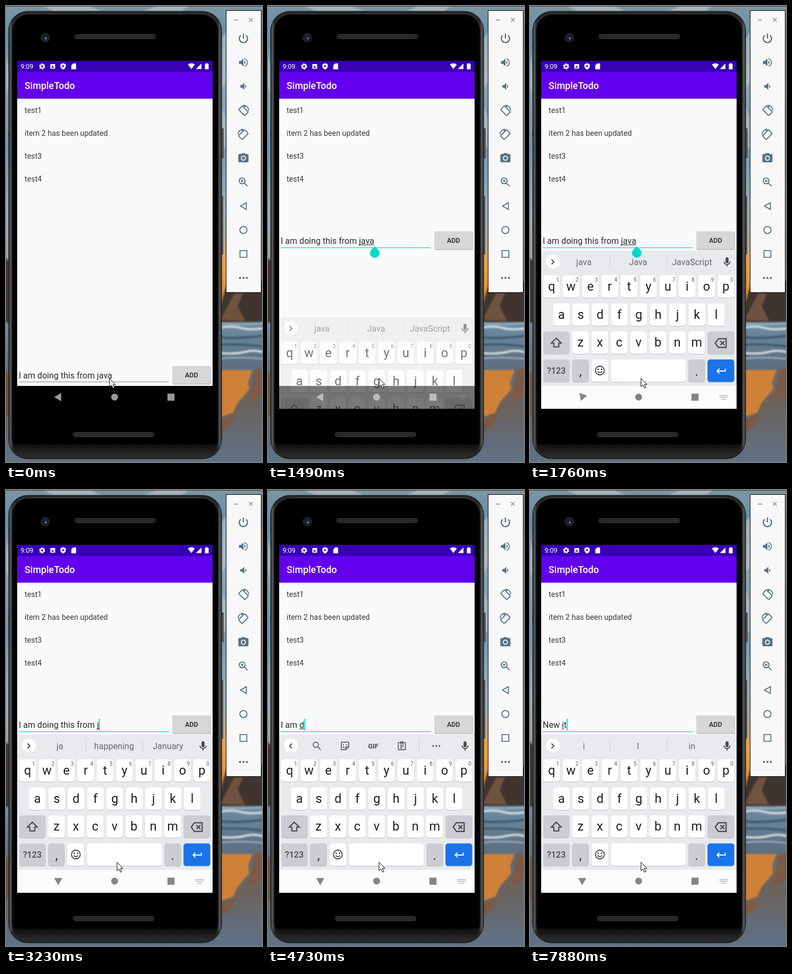
Animation of 482x857 px, one loop 8000 ms. Source, as an HTML page:

```html
<!DOCTYPE html>
<html lang="en">
<head>
<meta charset="utf-8">
<title>Todo app demo</title>
<style>
html, body { margin: 0; width: 100%; height: 100%; overflow: hidden; background: #000 }
svg { display: block; width: 482px; height: 857px }
text { font-family: Roboto, sans-serif; white-space: pre }
.mid { text-anchor: middle }
.line { fill: none; stroke: currentColor; stroke-width: 2 }
.fill { fill: currentColor }
</style>
</head>
<body>
<svg viewBox="0 0 482 857">
<defs>
  <linearGradient id="sky" x2="0" y2="1">
    <stop offset="0" stop-color="#7f959f"/><stop offset=".1" stop-color="#5d93b3"/>
    <stop offset=".25" stop-color="#8ba6b5"/><stop offset=".45" stop-color="#6c9ab8"/>
    <stop offset=".65" stop-color="#9ab0b8"/><stop offset="1" stop-color="#9c9488"/>
  </linearGradient>
  <linearGradient id="glow" x2="0" y2="1">
    <stop offset="0" stop-color="#e5a052" stop-opacity="0"/><stop offset=".4" stop-color="#eba23f"/>
    <stop offset="1" stop-color="#d27d2b"/>
  </linearGradient>
  <linearGradient id="sea" x2="0" y2="1">
    <stop offset="0" stop-color="#6d8ea5"/><stop offset=".3" stop-color="#5c7183"/>
    <stop offset=".6" stop-color="#6b625c"/><stop offset="1" stop-color="#5f7287"/>
  </linearGradient>
  <linearGradient id="edge">
    <stop offset="0" stop-color="#1b1b1c"/><stop offset=".007" stop-color="#58595b"/>
    <stop offset=".018" stop-color="#252627"/><stop offset=".982" stop-color="#252627"/>
    <stop offset=".993" stop-color="#58595b"/><stop offset="1" stop-color="#1b1b1c"/>
  </linearGradient>
  <linearGradient id="lip" x2="0" y2="1">
    <stop offset="0" stop-color="#0a0a0a"/><stop offset="1" stop-color="#2c2c2d"/>
  </linearGradient>
  <filter id="soft"><feGaussianBlur stdDeviation="1.500"/></filter>
  <clipPath id="screen"><path d="M21 103h368v654H21z"/></clipPath>
</defs>

<!-- wallpaper -->
<path fill="url(#sky)" d="M0 0h482v595H0z"/>
<path fill="url(#sea)" d="M0 592h482v265H0z"/>
<g filter="url(#soft)">
  <path fill="#c1c9cb" opacity=".6" d="M406 60l20-25v90l-20 30zM406 190l8 20v60l-8-10zM0 90l6 30v50l-6-20zM60-4h90l30 14H90zM290-4h60l-20 14h-70z"/>
  <path fill="url(#glow)" d="M400 415h20v178h-20z"/>
  <path fill="#40352f" d="M-4 470l10 10v115H-4zM404 566q12-62 30-66l56 20v74h-86z"/>
  <path fill="#6d5340" d="M404 590l26-50h16l-10 24 14 28z"/>
  <path fill="none" stroke="#d3dade" stroke-width="4" d="M400 605q24-5 42 0t48 0M400 652q30 3 50-2t40 3"/>
  <path fill="none" stroke="#b3bfc6" stroke-width="2" d="M400 597q40 3 90-1M400 663q40-5 90 1"/>
  <path fill="none" stroke="#415a6c" stroke-width="4" d="M400 622q30 5 90-3M400 637q40-3 90 4"/>
  <path fill="#cf8138" d="M400 684h64l-8 22 2 14-22 26-8 18-28 10z"/>
  <path fill="#7d5a45" d="M468 682h24v46l-40 18 12-32zM400 780l34-14-14 26-20 8z"/>
  <path fill="#6b553f" d="M-4 690h10v80H-4z"/>
</g>
<path fill="#2f3439" d="M0 0h482v1H0z"/>

<!-- phone -->
<path fill="#55575a" d="M4 72h3v9H4zM4 237h3v10H4zM404 72h2v9h-2zM404 230h6v56h-6zM404 357h5v110h-5z"/>
<rect x="5" y="10" width="401" height="841" rx="36" fill="url(#edge)" stroke="#161617"/>
<rect x="10.500" y="14.500" width="390" height="832" rx="32" fill="#0c0c0d" stroke="#5c5d5f" stroke-width=".7"/>
<rect x="14" y="17" width="383" height="828" rx="30"/>
<path fill="url(#lip)" d="M13 821q1 3 14 3h357q13 0 14-3 0 26-32 26H45q-32 0-32-26z"/>
<g fill="#1c1c1c" stroke="#48484a">
  <rect x="129.500" y="53.500" width="152" height="8" rx="4"/>
  <rect x="126.500" y="801.500" width="152" height="8" rx="4"/>
</g>
<path stroke="#3c3c3e" stroke-width="4" stroke-dasharray="1 1" d="M133 57.500h145M130 805.500h145"/>
<circle cx="74" cy="59.500" r="8" fill="#1d1e22" stroke="#333438"/>
<circle cx="74" cy="59.500" r="4" fill="#15234a"/>
<circle cx="75" cy="61" r="1.800" fill="#7186c9"/>

<!-- app -->
<g clip-path="url(#screen)">
  <path fill="#fafafa" d="M21 103h368v611H21z"/>
  <path id="navBase" fill="#fafafa" d="M21 713h368v44H21z"/>
  <path fill="#d4d4d6" d="M21 174h368v1.500H21z"/>
  <path fill="#ededee" d="M21 175.500h368v1.500H21z"/>
  <path fill="#6200ee" d="M21 124h368v50H21z"/>
  <path fill="#3700b3" d="M21 103h368v21H21z"/>
  <g fill="#fff">
    <text x="27.500" y="118" font-size="12.500">9:09</text>
    <text x="35" y="156" font-size="17.900" font-weight="500">SimpleTodo</text>
    <circle cx="68" cy="113.500" r="3.300" fill="none" stroke="#fff" stroke-width="2.500"/>
    <circle cx="68" cy="113.500" r="5" fill="none" stroke="#fff" stroke-width="1.600" stroke-dasharray="2.620"/>
    <rect x="83.500" y="109" width="9" height="9" rx="1"/>
    <text class="mid" x="88" y="116.500" font-size="8" font-weight="700" fill="#3700b3">A</text>
    <path d="M107.500 107.500l5 2v3.500q0 4-5 6.500-5-2.500-5-6.500v-3.500z"/>
    <path fill="#3700b3" d="M106 110.500l4.200 2.500-4.200 2.500z"/>
    <path d="M126.500 108h5.500v11h-9v-7.500z"/>
    <path d="M342.500 110q6.500-4.500 13 0l-6.500 8.500zM368 108v10.500h-10.500zM376.500 107.500h3v1.200h2V119h-7v-10.300h2z"/>
  </g>
  <g id="list" font-size="14.300" fill="#3a3a3a"></g>

  <g id="board">
    <path fill="#e8eaed" d="M21 460h368v254H21z"/>
    <path fill="#fcfcfc" d="M21 714h368v200H21z"/>
    <circle cx="43" cy="481.500" r="13.500" fill="#d0d2d5"/>
    <circle cx="43" cy="480.800" r="13.500" fill="#fff"/>
    <path id="chevron" fill="none" stroke="#444" stroke-width="1.800"/>
    <g id="words" class="mid" font-size="16.100" fill="#666a6e">
      <path stroke="#cdd0d4" d="M150.500 470v22M257.500 470v22"/>
      <text x="101.500" y="487"></text><text x="203.500" y="487"></text><text x="305" y="487"></text>
    </g>
    <g id="tools" color="#5a5d61"></g>
    <g id="keys"></g>
  </g>

  <path id="shade" d="M21 714h368v43H21z"/>
  <g id="nav">
    <path id="back" d="M90.500 735l13.500-7.700v15.400z"/>
    <circle cx="204.500" cy="735" r="6.500"/><path d="M304 728.500h13.300v13.300H304z"/>
    <path id="hide" fill="none" stroke="#8a8a8a" stroke-width="1.600" stroke-dasharray="1.600 1" d="M357 732h15M357 735.300h15M360 739h9"/>
  </g>

  <g id="row">
    <rect x="313.500" y="425" width="72.500" height="33.500" rx="2" fill="#b9b9b9"/>
    <rect x="313" y="423.500" width="72.500" height="33.500" rx="2" fill="#d6d7d7"/>
    <text class="mid" x="349.300" y="444.500" font-size="12.500" font-weight="500" fill="#222">ADD</text>
    <path id="field"/>
    <text id="input" x="24" y="447" font-size="16.050" fill="#2b2b2b"></text>
    <path id="under" stroke="#333" stroke-width="1.200"/>
    <rect id="caret" y="430" width="1.800" height="22" fill="#03dac5"/>
    <path id="handle" fill="#03dac5" d="M201 451.500l6.400 6.400a9 9 0 1 1-12.800 0z"/>
  </g>
</g>

<!-- emulator panel -->
<path fill="#f8f8f8" stroke="#000" d="M414.500 8.500h66v530h-66z"/>
<path fill="none" stroke="#7d8b92" stroke-width="1.300" d="M429 26.500h8M457.500 22.500l7 7M464.500 22.500l-7 7"/>
<g id="panel" color="#587280"></g>

<path id="mouse" fill="#fff" stroke="#000" d="M0 0v16l3.800-3.300 2.700 6 2.600-1.200-2.700-5.800h4.800z"/>
</svg>

<script>
const $ = id => document.getElementById(id);
const line = d => `<path class="line" d="${d}"/>`;
const fill = d => `<path class="fill" fill-rule="evenodd" d="${d}"/>`;
// places a 24-unit icon with its centre at x, y
const icon = (x, y, size, body) =>
  `<g transform="translate(${x} ${y}) scale(${size / 24}) translate(-12 -12)">${body}</g>`;
const dots = r => [5, 12, 19].map(x => `<circle class="fill" cx="${x}" cy="12" r="${r}"/>`).join('');

const speaker = 'M3 9v6h4l5 5V4L7 9z', wave = 'M14 8v8a4.500 4.500 0 0 0 0-8z';
const turn = '<rect class="line" x="7" y="4.500" width="10.500" height="17" rx="1.500" transform="rotate(-45 12 13)"/>'
  + line('M12.500 2a10.500 10.500 0 0 1 10 10M12 2l3.500 3.500');
$('panel').innerHTML = [
  [22, line('M12 2v10M6.500 5.500a8.500 8.500 0 1 0 11 0').replaceAll('/>', ' style="stroke-width:2.500"/>')],
  [22, fill(speaker + wave + 'M14 3.200v2a7 7 0 0 1 0 13.600v2a9 9 0 0 0 0-17.600z')],
  [20, icon(14, 12, 24, fill(speaker + wave))],
  [23, turn],
  [23, `<g transform="matrix(-1 0 0 1 24 0)">${turn}</g>`],
  [23, fill('M9 2L7.200 4H4a2 2 0 0 0-2 2v12a2 2 0 0 0 2 2h16a2 2 0 0 0 2-2V6a2 2 0 0 0-2-2h-3.200L15 2zM12 17a5 5 0 1 1 0-10 5 5 0 0 1 0 10z')
    + '<circle class="fill" cx="12" cy="12" r="3.200"/>'],
  [23, '<circle class="line" cx="9.500" cy="9.500" r="5.700"/>' + line('M13.700 13.700l6.300 6.300M9.500 7v5M7 9.500h5')],
  [22, line('M18 5v14L6 12z')],
  [22, '<circle class="line" cx="12" cy="12" r="7.300"/>'],
  [22, line('M5 5h14v14H5z')],
  [22, dots(2.2)]
].map(([size, body], i) => icon(447, 61 + 45 * i, size, body)).join('');

$('list').innerHTML = ['test1', 'item 2 has been updated', 'test3', 'test4']
  .map((s, i) => `<text x="35" y="${201 + 43 * i}">${s}</text>`).join('');

$('tools').innerHTML =
  icon(92, 481, 20, '<circle class="line" cx="9.500" cy="9.500" r="6"/>' + line('M14 14l6.500 6.500'))
  + icon(145, 481, 20, line('M5 3.500h14a1.500 1.500 0 0 1 1.500 1.500v9l-6.500 6.500H5A1.500 1.500 0 0 1 3.500 19V5A1.500 1.500 0 0 1 5 3.500zM14 20v-6h6M7 13q2 4 5 3')
    + fill('M7 8h2.500v2.500H7zM14 8h2.500v2.500H14z'))
  + '<text class="mid fill" x="198" y="485.500" font-size="12.500" font-weight="900">GIF</text>'
  + icon(252, 481, 20, line('M4 4.500h16v16H4zM8 10h8M8 13.500h8M8 17h5') + fill('M8 2h8v5H8z'))
  + '<path stroke="#cdd0d4" d="M284.500 470v22"/>'
  + icon(317, 481, 20, dots(2));

function key(x, y, w, label = '', color = '#fff', base = 28.7) {
  return `<rect x="${x}" y="${y + 1}" width="${w}" height="42.300" rx="5" fill="#b9bbbf"/>`
    + `<rect x="${x}" y="${y}" width="${w}" height="42.300" rx="5" fill="${color}"/>`
    + `<text class="mid" x="${x + w / 2}" y="${y + base}" font-size="23.500" fill="#1d1d1f">${label}</text>`;
}
const grey = '#cbcdd3', pitch = 36.45;
const letters = (s, x, y) => [...s].map((c, i) => key(x + pitch * i, y, 31.5, c)).join('');
$('keys').innerHTML = letters('qwertyuiop', 25, 506) + letters('asdfghjkl', 43.3, 559) + letters('zxcvbnm', 79.3, 611.5)
  + [...'1234567890'].map((n, i) =>
    `<text class="mid" x="${52 + pitch * i}" y="517.500" font-size="10" fill="#55585c">${n}</text>`).join('')
  + key(25, 611.5, 49.5, '', grey) + key(334.3, 611.5, 50.2, '', grey) + key(25, 664.3, 49.5, '', grey)
  + key(79.3, 664.3, 31.5, ',', grey, 31) + key(115.8, 664.3, 31.5) + key(152.3, 664.3, 141)
  + key(298, 664.3, 31.5, '.', grey, 31) + key(334.3, 664.3, 50.2, '', '#1a73e8')
  + '<text class="mid" x="49.500" y="691" font-size="16" font-weight="500" fill="#444649">?123</text><g color="#444649">'
  + icon(49.5, 633, 25, line('M12 3.500l-9 9h4.500v7h9v-7H21z'))
  + icon(359, 633.5, 26, line('M8 4.500h13.500v15H8L2.500 12zM11.500 8.500l7 7M18.500 8.500l-7 7'))
  + icon(131.5, 685, 22, '<circle class="line" cx="12" cy="12" r="9"/>' + line('M7.500 14q4.500 5 9 0')
    + '<circle class="fill" cx="8.500" cy="9.500" r="1.600"/><circle class="fill" cx="15.500" cy="9.500" r="1.600"/>')
  + icon(371, 481, 21, '<rect class="fill" x="8.800" y="2" width="6.400" height="12.500" rx="3.200"/>' + line('M5.500 11a6.500 6.500 0 0 0 13 0M12 17.500V22'))
  + '</g><g color="#fff">' + icon(359.5, 686, 22, line('M21 7v5H4M9 7l-5 5 5 5')) + '</g>';

// last row whose time has come
const at = (rows, t) => rows.findLast(r => r[0] <= t);

const oldText = 'I am doing this from java', newText = 'New it';
const lengths = [[0, 25], [2960, 24], [3110, 23], [3230, 22], [3380, 21], [3500, 20], [3620, 19], [3860, 18],
  [4010, 17], [4130, 15], [4250, 13], [4370, 11], [4490, 10], [4610, 8], [4730, 6], [4850, 4], [4970, 2], [5120, 0],
  [6330, 1], [6600, 2], [6900, 3], [7440, 4], [7600, 5], [7880, 6]];
const hints = [[0, 'java', 'Java', 'JavaScript'], [3110, 'ja', 'happening', 'January'], [3380],
  [6480, 'New', 'News', 'Newer'], [7740, 'i', 'I', 'in']];
// time, keyboard drop, opacity, shade, back arrow angle
const slide = [[0, 300, 0, 1, 0], [1340, 215, .3, .7, 0], [1490, 125, .6, .52, 0], [1610, 35, .9, .2, -35],
  [1760, 0, 1, 0, -70], [1880, 0, 1, 0, -87], [2030, 0, 1, 0, -90]];
const blink = [[0, 0], [910, 1], [1410, 0], [1880, 1], [2400, 0], [2960, 1], [5550, 0], [6050, 1]];

const pen = document.createElement('canvas').getContext('2d');
const set = (id, attrs) => { for (const k in attrs) $(id).setAttribute(k, attrs[k]); };
const show = (id, on) => set(id, { visibility: on ? 'visible' : 'hidden' });

function draw(t) {
  const focused = t >= 910, raised = t >= 1340;
  const text = (t < 5120 ? oldText : newText).slice(0, at(lengths, t)[1]);
  pen.font = '16.05px Roboto, sans-serif';
  const endOf = s => 24 + pen.measureText(s).width;

  $('input').textContent = text;
  set('row', { transform: `translate(0 ${raised ? 0 : 253})` });
  set('field', focused ? { fill: '#03dac5', d: 'M24 453.800h282.500v1.200H24z' } : { fill: '#858585', d: 'M24 453h282.500v1H24z' });
  set('caret', { x: endOf(text) - .2 });
  show('caret', at(blink, t)[1]);
  show('handle', focused && t < 2960);

  // the word being composed is underlined a moment late
  const marked = text.slice(0, at(lengths, Math.max(0, t - 130))[1]);
  const start = marked.lastIndexOf(' ') + 1;
  set('under', { d: `M${endOf(marked.slice(0, start))} 448.800H${endOf(marked)}` });
  show('under', raised && start < marked.length);

  const [, drop, alpha, shade, angle] = at(slide, t);
  set('board', { transform: `translate(0 ${drop})`, opacity: alpha });
  set('shade', { opacity: shade });
  set('back', { transform: `rotate(${angle} 98.300 735)` });
  set('nav', { fill: !raised ? '#999' : shade ? '#bcbcbc' : '#858585' });
  show('navBase', raised);
  show('hide', raised);

  const [, ...words] = at(hints, t), hasWords = words.length > 0;
  show('words', hasWords);
  show('tools', !hasWords);
  $('words').querySelectorAll('text').forEach((el, i) => el.textContent = words[i] || '');
  set('chevron', { d: hasWords ? 'M40.500 476.500l4.500 4.500-4.500 4.500' : 'M45 476.500l-4.500 4.500 4.500 4.500' });

  const p = Math.min(1, Math.floor((t + 2) / 152) / 6);
  set('mouse', { transform: `translate(${195 + 14 * p} ${700 - .5 * p + 13 * Math.sin(Math.PI * p)})` });
}

function tick() {
  draw(performance.now() % 8000);
  requestAnimationFrame(tick);
}
tick();
</script>
</body>
</html>
```
